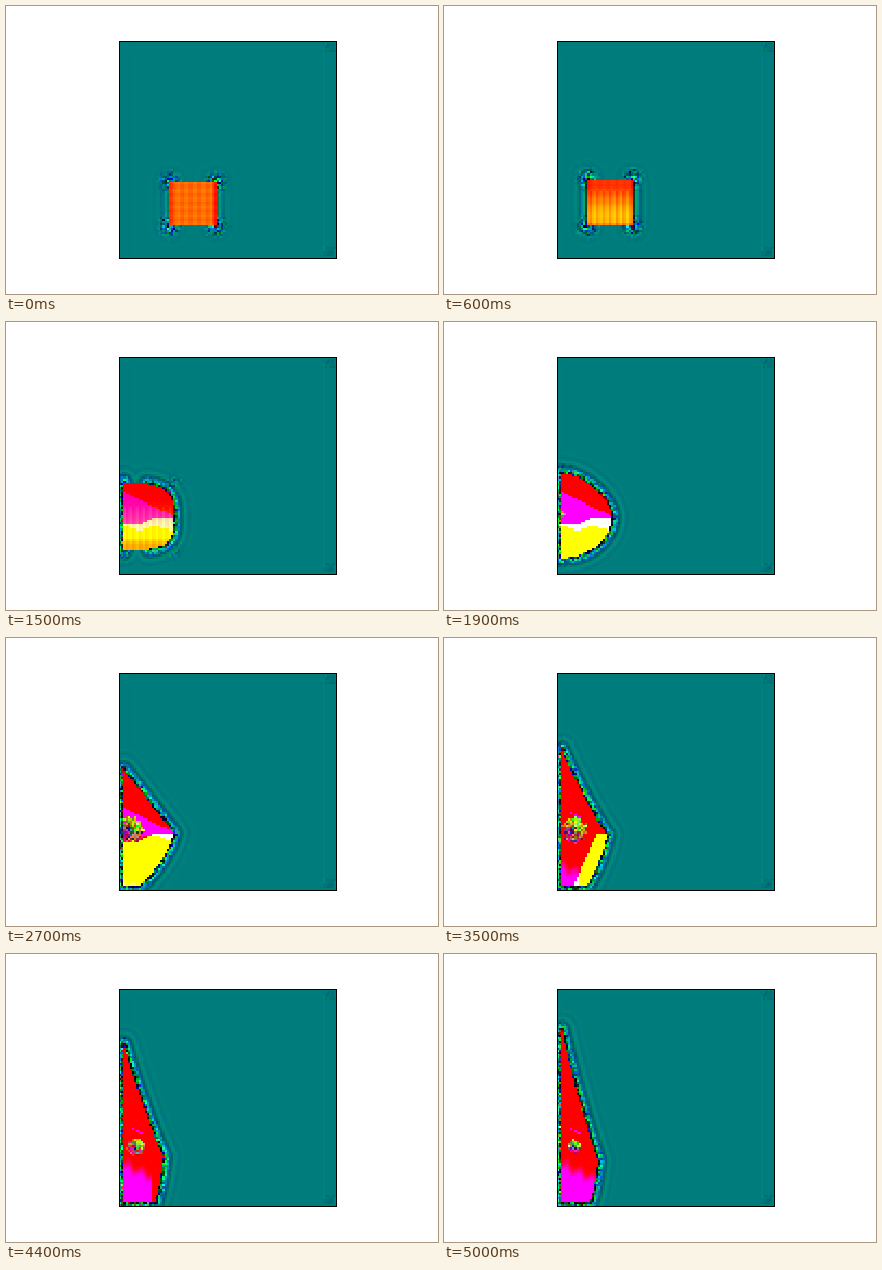
A matplotlib script for the animation above (5100 ms loop, 432 by 288 pixels).

```python
import numpy as np
import matplotlib.pyplot as plt
from matplotlib.animation import FuncAnimation

W, H = 432, 288
N = 100                      # cells per side
LEFT, TOP, SIDE = 113.2, 35.0, 217.0
FRAMES, INTERVAL = 51, 100
REST = 0.49                  # resting level of green and blue
WALL, HIT = 118, 11          # wall position, time of contact

axis = (np.arange(N) + 0.5) * SIDE / N
X, Y = np.meshgrid(LEFT + axis, TOP + axis)


def ramp(v):
    return np.clip(v, 0, 1)


def slant(y_wall, y_tip):
    """Height of a line running from the wall to the tip of the body."""
    return y_wall + (y_tip - y_wall) * (X - WALL) / 50


def bulge(s, p):
    """Superellipse arc: box for large p, round at 2, straight at 1."""
    return (1 - (1 - ramp(s)) ** p) ** (1 / p)


class Body:
    """Block that slides to the wall, then spreads up and down along it."""

    def __init__(self, t):
        after = max(0, t - HIT)
        self.left = max(WALL, 164 - 3.4 * t)
        self.top = 176 - 0.5 * min(t, HIT) - 2.42 * after
        self.bottom = 220 + min(28, 2 * after)
        self.tip = max(168, 210 - 3.45 * t) - 0.6 * max(0, t - 27)
        self.tip_y = 195 + 0.6 * max(0, t - 32)
        self.power = 0.92 + 7 * np.exp((HIT - t) / 3.5)
        self.foot = np.clip((t - 19) / 30, 0, 0.78)

    def right(self, y):
        upper = bulge((y - self.top) / (self.tip_y - self.top), self.power)
        lower = bulge((self.bottom - y) / (self.bottom - self.tip_y),
                      self.power + 0.3)
        lower = self.foot + (1 - self.foot) * lower
        width = np.where(y < self.tip_y, upper, lower)
        return self.left + (self.tip - self.left) * width

    def distance(self):
        """Signed distance to the outline, positive outside."""
        ys = np.linspace(self.top, self.bottom, 70)
        xs = self.right(ys)
        s = np.linspace(0, 1, 20)
        px = np.concatenate([xs, np.full(70, self.left),
                             self.left + s * (xs[0] - self.left),
                             self.left + s * (xs[-1] - self.left)])
        py = np.concatenate([ys, ys, np.full(20, self.top),
                             np.full(20, self.bottom)])
        d2 = np.full((N, N), 1e9)
        for x, y in zip(px, py):
            np.minimum(d2, (X - x) ** 2 + (Y - y) ** 2, out=d2)
        inside = ((X > self.left) & (X < self.right(Y))
                  & (Y > self.top) & (Y < self.bottom))
        return np.where(inside, -1, 1) * np.sqrt(d2)


def make_background():
    img = np.zeros((N, N, 3))
    img[..., 1:] = REST
    img[:, N - 6, 1:] += 0.014
    img[:, 4, 1:] -= 0.006
    img[4, :, 1:] -= 0.005
    rng = np.random.default_rng(4)
    for row in (1, N - 5):
        img[row:row + 4, N - 6:, 1:] += rng.normal(-0.02, 0.03, (4, 6, 2))
    return img


BACKGROUND = make_background()


def halo(img, t, body, d, rng):
    """Ringing around the body, speckled at the corners and the wall."""
    late = ramp((t - 8) / 9)
    dx = np.minimum(abs(X - body.left), abs(X - body.tip))
    dy = np.minimum(abs(Y - body.top), abs(Y - body.bottom))
    corner = np.exp(-(dx ** 2 + dy ** 2) / 60)
    at_wall = late * (X < WALL + 1)

    ring = (0.24 + 0.03 * min(t, 11)) * np.exp(-d / 5)
    speck = (late * np.exp(-(d / 4.5) ** 2) + (1 - late) * corner
             + 0.25 * at_wall * np.exp(-d / 6))
    noise = rng.normal(0, 0.45, (N, N, 3))
    red = speck * (noise[..., 0] - 0.4 + 0.35 * at_wall) * (d < 5)
    green = BACKGROUND[..., 1] - ring * np.cos(d * 0.8) \
        + speck * (noise[..., 1] - 0.15)
    blue = BACKGROUND[..., 2] - ring * np.cos(d * 0.8 - 1.3) \
        + speck * noise[..., 2]
    out = (d >= 0) & (d < 22)
    img[out] = np.stack([red, green, blue], axis=-1)[out]


def early_green(t, d, left):
    """Orange block with streaks that turns yellow towards its base."""
    u, v = X - left, Y - 176
    k = min(t / HIT, 1)
    streaks = 0.06 * np.cos(u * 0.75) + 0.04 * np.cos(v * 0.75)
    flat = 0.42 * np.clip(-d / 4, 0.3, 1) + streaks
    heat = 0.95 * ramp((Y - 180) / 26) * ramp((222 - Y) / 6)
    heat += 0.2 * np.cos(u * 0.95) * (Y > 184)
    return (1 - k) * flat + k * heat


def late_bands(t):
    """Green and blue masks: red, magenta, white and yellow bands."""
    wave = 1.8 * np.sin(X / 5)
    closing = ramp((33 - t) / 14) ** 0.5
    start = slant(170, 194)
    band = (Y > start) & (Y < start + closing * slant(36, 12) + wave)

    lag = max(0, t - 27)
    edge = 114 + lag * (4.6 - 2.5 * (Y - 200) / 46)
    green = (Y > slant(203, 194) + wave) & (X > edge)

    low = slant(0, 24) + max(204, 240 - 2.2 * (t - 27))
    soft = ramp((Y - low) / 12 + 0.25 * np.sin(X / 2.3 + Y / 9))
    reach = X < 134 + 1.5 * max(0, t - 36)
    return green, np.maximum(band, soft * reach)


def vortex(img, t, inside, rng):
    """Eddy by the wall, dark on its left and green on its right."""
    r = 13 * ramp((t - 17) / 8) - 0.45 * max(0, t - 36)
    if r < 1:
        return
    dx = X - WALL - 0.9 * np.clip(t - 19, 0, 14)
    dy = Y - 192
    q = np.hypot(dx, dy) / r
    turn = np.cos(np.arctan2(dy, dx) + 1.5 * q)
    swirl = np.stack([0.35 + 0.5 * q, 0.45 + 0.45 * turn, 0.25 - 0.2 * turn],
                     axis=-1) + rng.normal(0, 0.28, (N, N, 3))
    spot = inside & (q < 0.8 + 0.3 * rng.random((N, N)))
    img[spot] = swirl[spot]


def field(t):
    rng = np.random.default_rng(100 + t)
    body = Body(t)
    d = body.distance()
    inside = d < 0
    img = BACKGROUND.copy()
    halo(img, t, body, d, rng)

    mix = ramp((t - HIT) / 6)
    green, blue = late_bands(t)
    green = (1 - mix) * early_green(t, d, body.left) + mix * green
    fill = np.stack([np.ones((N, N)), green, mix * blue], axis=-1)
    img[inside] = fill[inside]
    vortex(img, t, inside, rng)
    return np.clip(img, 0, 1)


fig = plt.figure(figsize=(W / 72, H / 72), dpi=72, facecolor="white")
ax = fig.add_axes([LEFT / W, 1 - (TOP + SIDE) / H, SIDE / W, SIDE / H])
ax.set_xticks([])
ax.set_yticks([])
for spine in ax.spines.values():
    spine.set_linewidth(1)
picture = ax.imshow(field(0), interpolation="nearest", aspect="auto")


def update(i):
    picture.set_data(field(i))
    return [picture]


anim = FuncAnimation(fig, update, frames=FRAMES, interval=INTERVAL,
                     repeat=True, repeat_delay=0)
plt.show()
```
